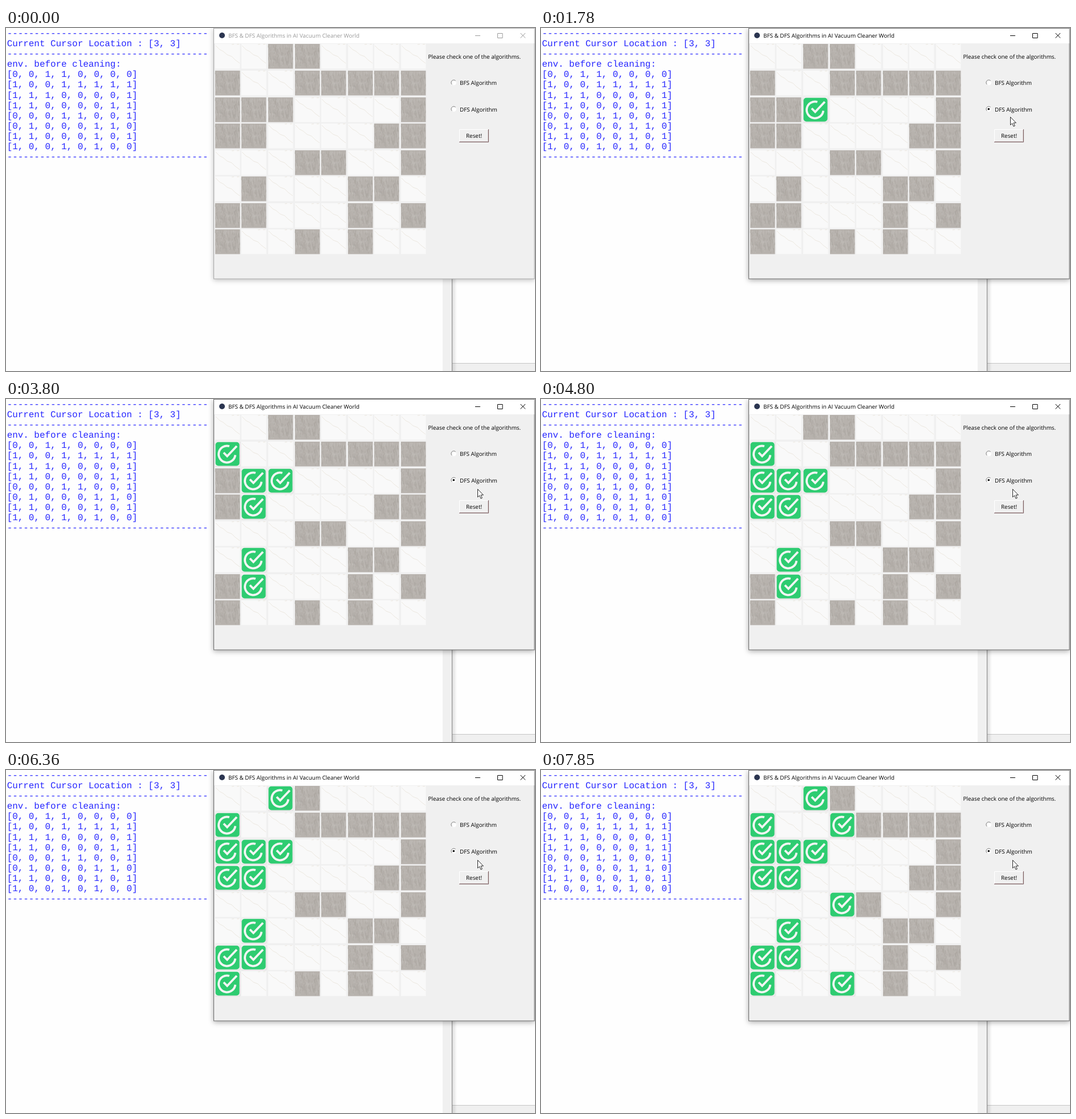
These frames come from a looping animation (928x603 px, 8000 ms). An HTML page:

```html
<!DOCTYPE html>
<html lang="en">
<head>
<meta charset="utf-8">
<title>Vacuum cleaner world</title>
<style>
  html, body { margin: 0; width: 100%; height: 100%; overflow: hidden; background: #fefefe; }
  svg { display: block; width: 928px; height: 603px; }
  text { text-rendering: geometricPrecision; white-space: pre; }
  .log { font: 15.9px "Liberation Mono", monospace; fill: #2626ff; }
  .ui { font: 9.9px "Open Sans", "Noto Sans", sans-serif; fill: #000; }
  #frame { fill: #f0f0f0; stroke: #a8a8a8; filter: drop-shadow(0 2px 4px rgba(0, 0, 0, .25)); }
  .active #frame { stroke: #6a6a6a; filter: drop-shadow(0 2px 5px rgba(0, 0, 0, .34)); }
  #title { fill: #999; }
  #controls { fill: none; stroke: #999; }
  .active #title { fill: #000; }
  .active #controls { stroke: #000; }
</style>
</head>
<body>
<svg viewBox="0 0 928 603">
  <defs>
    <linearGradient id="sideShade">
      <stop offset="0" stop-color="#000" stop-opacity=".13"/>
      <stop offset="1" stop-color="#000" stop-opacity="0"/>
    </linearGradient>
    <g id="marble">
      <rect width="43.5" height="43.5" fill="#f9f9f9"/>
      <g fill="none" stroke="#e9e4da" stroke-width=".8">
        <path d="M1 3L8 10L14 13L21 19L29 22L35 28L43 34"/>
        <path d="M29 1L33 .6M38 .8L42 .6"/>
      </g>
    </g>
    <g id="dirty">
      <rect width="43.5" height="43.5" fill="#b7b2ad"/>
      <path id="lightStreaks" stroke="#c0bcb7" stroke-width=".9"/>
      <path id="darkStreaks" stroke="#aca7a2" stroke-width=".9"/>
    </g>
    <g id="done">
      <rect width="43.5" height="43.5" fill="#f0f0f0"/>
      <rect x=".5" y=".8" width="42" height="41.6" rx="5" fill="#2ecc71"/>
      <g fill="none" stroke="#f4f6f4" stroke-width="3.8">
        <path d="M24.8 8A14.6 14.6 0 1 0 35.2 23.5"/>
        <path d="M14.8 19.2L21 25.6L37.8 7.8"/>
      </g>
    </g>
    <g id="radio">
      <circle r="4.5" fill="#fff"/>
      <path d="M-3.2 3.2A4.5 4.5 0 0 1 3.2 -3.2" fill="none" stroke="#777"/>
    </g>
  </defs>

  <rect width="928" height="603" fill="#fefefe"/>
  <rect x="766" width="16" height="603" fill="#f0f0f0"/>
  <rect x="783" y="589" width="145" height="14" fill="#f0f0f0"/>
  <path d="M783 589.5H928" stroke="#c6c6c6"/>
  <rect x="783" width="8" height="603" fill="url(#sideShade)"/>
  <path d="M782.5 0V603" stroke="#868686"/>
  <g id="log" class="log"></g>

  <g id="window">
    <rect id="frame" x="364.5" y=".5" width="562.5" height="440.5"/>
    <rect x="365" y="1" width="561.5" height="26" fill="#fff"/>
    <circle cx="379" cy="13" r="5" fill="#2b3550"/>
    <text id="title" class="ui" x="390" y="17">BFS &amp; DFS Algorithms in AI Vacuum Cleaner World</text>
    <path id="controls" d="M823 13.5H832M862.5 9.5H871V17.5H862.5ZM902.5 9L911 17.5M911 9L902.5 17.5"/>
    <g id="tiles"></g>
    <g class="ui">
      <text x="740.5" y="53.5">Please check one of the algorithms.</text>
      <text x="796" y="100.3">BFS Algorithm</text>
      <text x="796" y="146.8">DFS Algorithm</text>
    </g>
    <use href="#radio" x="785.5" y="96"/>
    <use href="#radio" x="785.5" y="142.5"/>
    <circle id="dot" cx="785.3" cy="142.5" r="1.8"/>
    <path d="M795.5 200V178.5H846" fill="none" stroke="#fff"/>
    <path d="M795 200.5H846.5V178" fill="none" stroke="#7d5f62"/>
    <path d="M796 199.5H845.5V179" fill="none" stroke="#cfc6c6"/>
    <text class="ui" x="807" y="193.3">Reset!</text>
  </g>
  <path id="cursor" d="M.5 .5V14.5L3.7 11.6L6 17L8.3 16L6 10.8H10.4Z" fill="#fff" stroke="#111" stroke-width=".9"/>
</svg>
<script>
const LOOP = 8000, FOCUS_AT = 1230, SELECT_AT = 1285, CLEAN_EVERY = 502;
const rooms = ['00110000', '10011111', '11100001', '11000011',
               '00011001', '01000110', '11000101', '10010100'];
const isDirty = (column, row) => rooms[row][column] === '1';

// The vacuum sweeps along columns and stops at dirty rooms.
const sweeps = [
  { column: 2, from: 2, to: 2 },
  { column: 1, from: 7, to: 0 },
  { column: 0, from: 0, to: 7 },
  { column: 2, from: 1, to: 0 },
  { column: 3, from: 1, to: 7 }
];
const pointerStart = { x: 649, y: 9 };
const pointerMoves = [
  { begin: 220, end: 720, x: 834, y: 142 },
  { begin: 720, end: 1150, x: 791, y: 141 },
  { begin: 1450, end: 1950, x: 827, y: 158 }
];

const $ = id => document.getElementById(id);
function add(parent, name, attributes, text = '') {
  const node = document.createElementNS('http://www.w3.org/2000/svg', name);
  for (const key in attributes) node.setAttribute(key, attributes[key]);
  node.textContent = text;
  return parent.appendChild(node);
}
const show = (node, on) => node.setAttribute('visibility', on ? 'visible' : 'hidden');

let seed = 17;
const random = () => (seed = seed * 16807 % 2147483647) / 2147483647;
function streaks(count) {
  let d = '';
  for (let i = 0; i < count; i++) {
    const length = 2 + random() * 6;
    d += `M${(random() * 43).toFixed(1)} ${(random() * (43 - length)).toFixed(1)}v${length.toFixed(1)}`;
  }
  return d;
}
$('lightStreaks').setAttribute('d', streaks(70));
$('darkStreaks').setAttribute('d', streaks(70));

const rule = '-'.repeat(37);
const lines = [rule, 'Current Cursor Location : [3, 3]', rule, 'env. before cleaning:',
  ...rooms.map(row => `[${[...row].join(', ')}]`), rule];
lines.forEach((line, i) => add($('log'), 'text', { x: 1.7, y: 13.9 + i * 18.1 }, line));

const pitch = 46.58;
const addTile = (kind, column, row) => add($('tiles'), 'use',
  { href: '#' + kind, x: Math.round(366.8 + column * pitch), y: Math.round(28.4 + row * pitch) });
rooms.forEach((cells, row) => [...cells].forEach((_, column) =>
  addTile(isDirty(column, row) ? 'dirty' : 'marble', column, row)));

const checks = [];
for (const { column, from, to } of sweeps) {
  const step = Math.sign(to - from) || 1;
  for (let row = from; row !== to + step; row += step)
    if (isDirty(column, row)) checks.push(addTile('done', column, row));
}

const easeOut = u => 1 - (1 - u) ** 2;
function pointerAt(t) {
  let { x, y } = pointerStart;
  for (const move of pointerMoves) {
    const u = easeOut(Math.min(1, Math.max(0, (t - move.begin) / (move.end - move.begin))));
    x += (move.x - x) * u;
    y += (move.y - y) * u;
  }
  return `translate(${Math.round(x)} ${Math.round(y)})`;
}

function render(t) {
  $('window').classList.toggle('active', t >= FOCUS_AT);
  show($('dot'), t >= SELECT_AT);
  checks.forEach((node, i) => show(node, t >= SELECT_AT + i * CLEAN_EVERY));
  show($('cursor'), t >= pointerMoves[0].begin);
  $('cursor').setAttribute('transform', pointerAt(t));
}

const start = performance.now();
function tick() {
  render((performance.now() - start) % LOOP);
  requestAnimationFrame(tick);
}
render(0);
requestAnimationFrame(tick);
</script>
</body>
</html>
```
